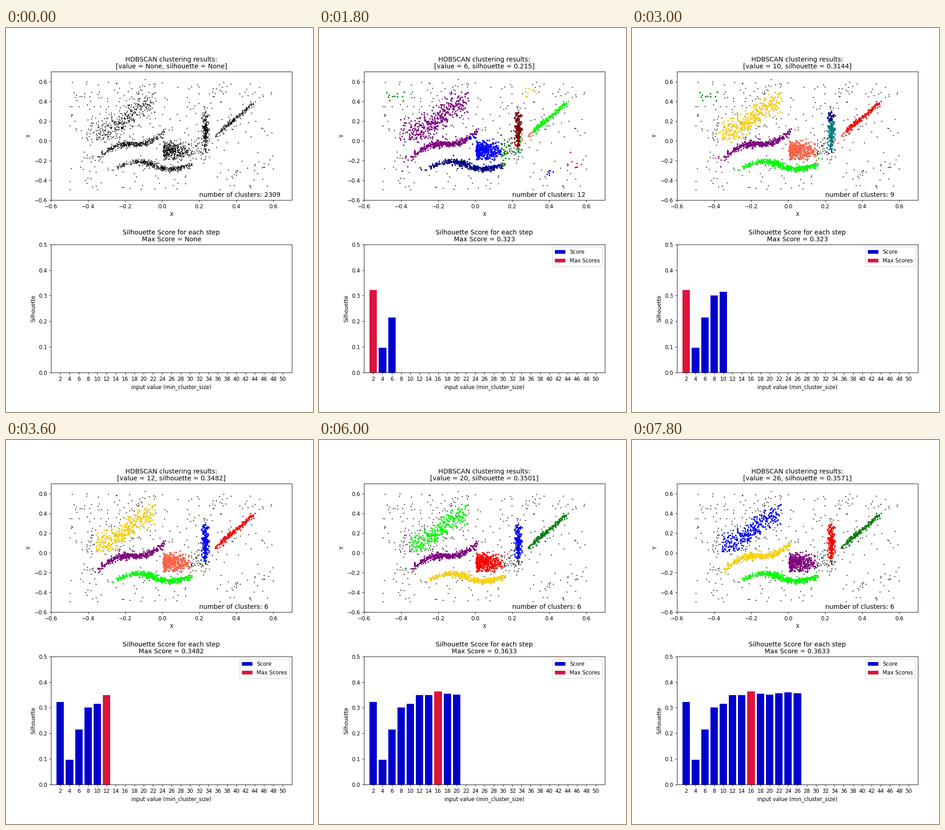
A matplotlib script for the animation above (8000 ms loop, 669 by 837 pixels).

```python
import numpy as np
import matplotlib.pyplot as plt
from matplotlib.animation import FuncAnimation
from matplotlib.patches import Patch

W, H, DPI = 669, 837, 72      # at 72 dpi one point is one pixel
K = 1.162                     # scale of all default sizes
TOTAL = 2309
COLORS = dict(r="red", b="blue", g="green", l="lime", y="gold", p="purple",
              n="navy", m="maroon", t="tomato", e="teal")
SCORES = [0.323, 0.0961, 0.215, 0.3006, 0.3144, 0.3482, 0.3497,
          0.3633, 0.3545, 0.3501, 0.3558, 0.3602, 0.3571]

plt.rcParams.update({
    "font.family": "DejaVu Sans", "font.size": 10 * K,
    "axes.titlesize": 12 * K, "axes.titlepad": 6 * K,
    "axes.labelpad": 4 * K, "axes.linewidth": 0.8 * K,
    "patch.linewidth": K,
})
for axis in ("xtick", "ytick"):
    plt.rcParams.update({f"{axis}.major.size": 3.5 * K,
                         f"{axis}.major.pad": 3.5 * K,
                         f"{axis}.major.width": 0.8 * K})


def arc_curve(x):
    rise, drop = np.maximum(x + .13, 0), np.maximum(-.2 - x, 0)
    return -.035 + 6.5 * (rise ** 2 - drop ** 2)


# name: centre line, sigma across it, core range along it, reach in sigmas
GROUPS = {
    "cloud": (lambda x: .24 + .16 * np.tanh((x + .19) / .1),
              .065, -.345, -.04, 1.6),
    "arc": (arc_curve, .017, -.34, .015, 3),
    "snake": (lambda x: -.25 + .04 * np.cos(2 * np.pi * (x + .13) / .36),
              .015, -.25, .16, 3),
    "block": (lambda x: -.097 + 0 * x, .047, 0, .15, 2.3),
    "bar": (lambda y: .233 + 0 * y, .0085, -.06, .28, 3),
    "slope": (lambda x: .04 + 1.6 * (x - .28), .012, .287, .508, 4),
}
# Loose patches: x range, y range, size, colour
PATCHES = [(-.48, -.38, .39, .53, 11, "green"), (.26, .33, .43, .53, 9, "gold"),
           (.48, .58, -.29, -.09, 9, "red"), (.38, .44, -.37, -.28, 7, "blue")]
# Parts that split off: group, range along it, first and last value, colour
SPLITS = [("block", .14, .19, 6, 6, "green"),
          ("bar", -.14, -.07, 6, 6, "seagreen"),
          ("slope", .25, .312, 6, 10, "salmon"),
          ("bar", .2, .3, 8, 10, "navy"),
          ("snake", -.03, .2, 16, 16, "red")]
# Group colours for the values 6, 8, ... 26
PLANS = ("ppnbml lpyter yplter ypltbr lpyrbt yptlbg "
         "yplrbt lpyrbg bplyrt yplrbt bylprg").split()

rng = np.random.default_rng(11)


def clipped(draw, lo, hi, n):
    """n samples of draw(size) that fall between lo and hi."""
    s = draw(6 * n)
    return s[(s > lo) & (s < hi)][:n]


def around(name, u, noise):
    curve, sigma = GROUPS[name][:2]
    return np.c_[u, curve(u) + sigma * noise]


def in_box(p, x0, x1, y0, y1):
    x, y = p.T
    return (x > x0) & (x < x1) & (y > y0) & (y < y1)


def make_points():
    normal = rng.normal

    def bell(center, spread, lo, hi, n):
        return clipped(lambda m: normal(center, spread, m), lo, hi, n)

    halo = np.where(rng.random(400) < .33, 2.1, .8)
    cloud = around("cloud", bell(-.2, .1, -.44, -.035, 400),
                   normal(0, 1, 400) * halo)
    cloud[:, 1] = np.minimum(cloud[:, 1], .63 - .1 * rng.random(400) ** 2)
    arc = around("arc", bell(-.17, .12, -.352, .018, 340), normal(0, 1, 340))
    snake = around("snake", bell(-.02, .12, -.3, .165, 380), normal(0, 1, 380))
    block = around("block",
                   clipped(lambda m: .006 + abs(normal(0, .066, m)), 0, .25, 390),
                   bell(0, 1, -2.2, 2.2, 390))
    tail = np.c_[rng.uniform(.12, .26, 45), normal(-.1, .055, 45)]
    bar = around("bar", bell(.1, .1, -.17, .34, 240), normal(0, 1, 240))[:, ::-1]
    slope = around("slope", .28 + .22 * rng.beta(1.7, 1.6, 190),
                   np.clip(rng.standard_t(3, 190), -7, 7))

    parts = [cloud, arc, snake, block, tail, bar, slope]
    parts += [rng.uniform((x0, y0), (x1, y1), (n, 2))
              for x0, x1, y0, y1, n, _ in PATCHES]
    rest = TOTAL - sum(map(len, parts))
    noise = rng.uniform((-.5, -.5), (.6, .6), (3 * rest, 2))
    for box in PATCHES:
        noise = noise[~in_box(noise, *box[:4])]
    return np.vstack(parts + [noise[:rest]])


def blank():
    return np.full(TOTAL, "", dtype="U8")


def seeded_groups(count, smallest, largest, reach):
    """Colour random seeds together with their nearest free neighbours."""
    colors, names = blank(), list(COLORS.values())
    for c in range(count):
        free = np.flatnonzero(colors == "")
        gap = (points[free] - points[rng.choice(free)]) * (403.5, 215)
        dist = np.hypot(*gap.T)
        near = np.argsort(dist)[:rng.integers(smallest, largest + 1)]
        near = near[dist[near] < reach]
        if len(near) > 1:
            colors[free[near]] = names[c * 7 % len(names)]
    return colors, count


def shaped_groups(value, plan):
    """Colour the large groups; they are tightest at a value of 20."""
    grow = ((value - 20) / 14) ** 2
    colors, count = blank(), len(set(plan))

    def fill(name, color, lo, hi):
        curve, sigma, *_, reach = GROUPS[name]
        u, v = points.T[::-1] if name == "bar" else points.T
        close = abs(v - curve(u)) < sigma * reach * (1 + .5 * grow)
        colors[close & (u > lo) & (u < hi)] = color

    for (name, group), key in zip(GROUPS.items(), plan):
        lo, hi = group[2:4]
        fill(name, COLORS[key], lo - .2 * grow * (hi - lo), hi + .01 * grow)
    for name, lo, hi, first, last, color in SPLITS:
        if first <= value <= last:
            fill(name, color, lo, hi)
            count += 1
    for *box, size, color in PATCHES:
        if size >= value:
            colors[in_box(points, *box)] = color
            count += 1
    return colors, count


points = make_points()
STEPS = [(blank(), TOTAL), seeded_groups(342, 2, 6, 25),
         seeded_groups(64, 4, 48, 26)]
STEPS += [shaped_groups(6 + 2 * k, plan) for k, plan in enumerate(PLANS)]

fig = plt.figure(figsize=(W / DPI, H / DPI), dpi=DPI, facecolor="white")


def add_axes(top, height=279.6):
    return fig.add_axes([98.1 / W, 1 - (top + height) / H,
                         524.7 / W, height / H])


upper = add_axes(95)
fifths = np.arange(-3, 4) / 5
upper.set(xlim=(-.6, .7), ylim=(-.6, .7), xlabel="X", ylabel="Y",
          xticks=fifths, yticks=fifths)
upper.scatter(*points.T, s=2.2 ** 2, c="black", linewidths=0)
dots = upper.scatter([], [], s=3.2 ** 2, linewidths=0)
label = upper.text(.2, -.57, "", fontsize=12 * K)

lower = add_axes(471.6)
values = np.arange(2, 51, 2)
lower.set(xlim=(0, 52), ylim=(0, .5), xticks=values, yticks=np.arange(6) / 10,
          xlabel="input value (min_cluster_size)", ylabel="Silhouette")
bars = lower.bar(values[:len(SCORES)], SCORES, width=1.6, linewidth=0)
legend = lower.legend(
    handles=[Patch(color="mediumblue", label="Score", lw=0),
             Patch(color="crimson", label="Max Scores", lw=0)],
    loc="upper right")


def update(i):
    step = i // 3
    shown = SCORES[:step]
    best = max(shown, default=None)
    value = 2 * step if step else None
    score = f"{shown[-1]:g}" if step else None
    peak = f"{best:g}" if step else None
    upper.set_title("HDBSCAN clustering results:\n"
                    f"[value = {value}, silhouette = {score}]",
                    linespacing=1.1)
    lower.set_title(f"Silhouette Score for each step\nMax Score = {peak}",
                    linespacing=1.1)

    colors, count = STEPS[step]
    label.set_text(f"number of clusters: {count}")
    on = colors != ""
    dots.set_visible(bool(on.any()))
    if on.any():
        dots.set_offsets(points[on])
        dots.set_facecolors(colors[on].tolist())

    for k, bar in enumerate(bars):
        bar.set_visible(k < step)
        bar.set_facecolor("crimson" if SCORES[k] == best else "mediumblue")
    legend.set_visible(step > 0)
    return []


anim = FuncAnimation(fig, update, frames=40, interval=200, repeat=True,
                     repeat_delay=0)
plt.show()
```
